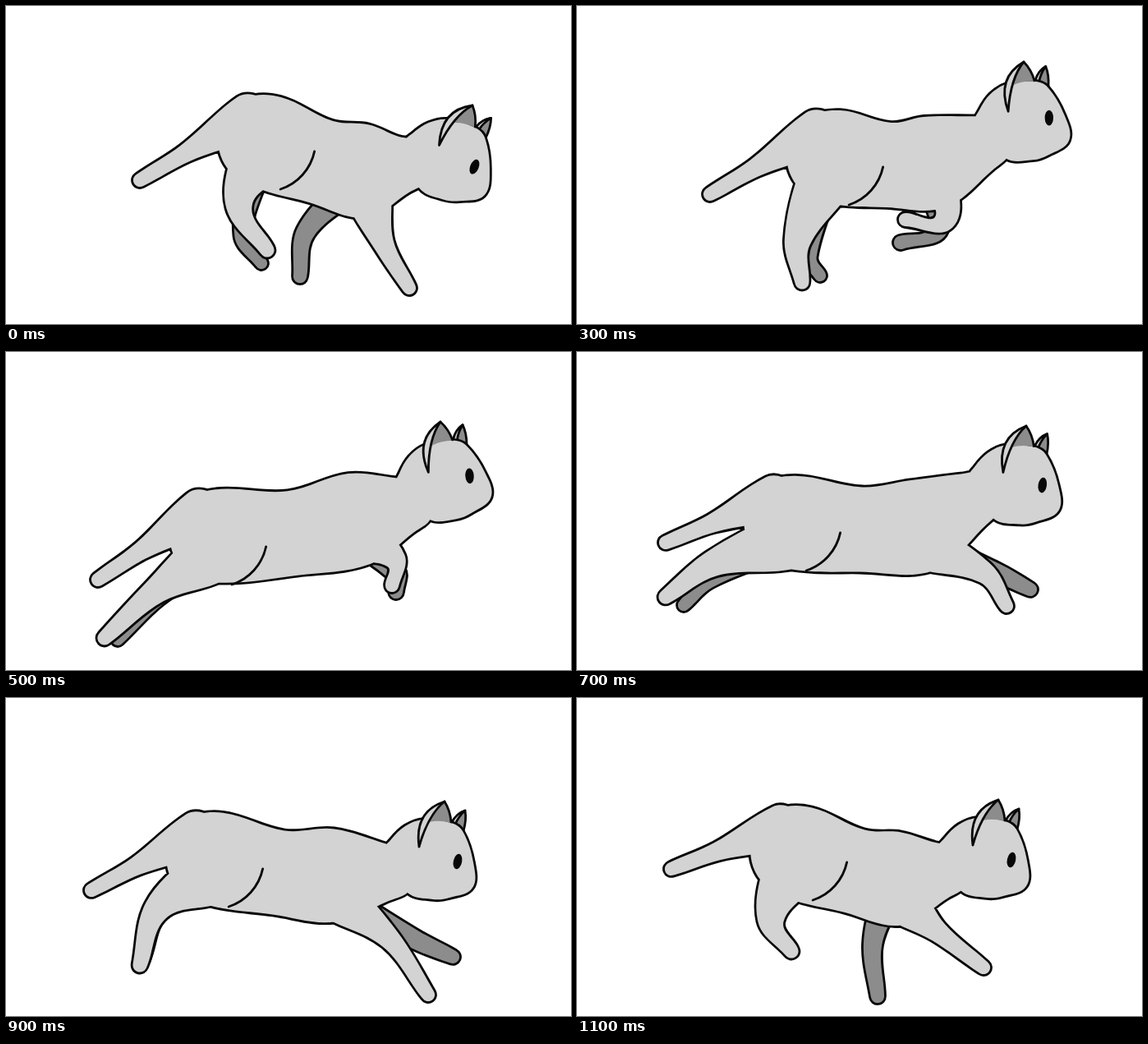
Write an HTML page that moves like this. It is 688 px wide and 387 px high and loops after 1200 ms.

```html
<!DOCTYPE html>
<html lang="en">
<head>
<meta charset="utf-8">
<title>Running cat</title>
<style>
  html, body { margin: 0; width: 100%; height: 100%; overflow: hidden; background: #fff; }
  svg { display: block; width: 100%; height: 100%; }
  path { stroke: #080808; stroke-width: 2.8; stroke-linecap: round; stroke-linejoin: round; fill: none; }
  /* The outline goes under the fill, so overlapping parts merge into one silhouette. */
  .merged { stroke-width: 5.6; paint-order: stroke; }
  .light { fill: #d3d3d3; }
  .dark { fill: #8c8c8c; }
  .bare { stroke: none; }
</style>
</head>
<body>
<svg viewBox="0 0 688 387">
  <path id="farHind" class="merged dark"/>
  <path id="farFront" class="merged dark"/>
  <g class="head">
    <path class="dark" d="M9,25Q15,15 25,11Q27,22 23,36"/>
    <path class="light" d="M13,28Q17,18 25,11Q15,14 9,25"/>
  </g>
  <path id="coat" class="merged light"/>
  <path id="haunch"/>
  <g class="head">
    <path class="dark bare" d="M0,0Q7,11 8,26Q-6,22 -19,25L-18,20Z"/>
    <path class="light" d="M-31,55Q-37,12 0,0Q-20,16 -31,55"/>
    <path d="M0,0Q7,11 8,25"/>
    <ellipse cx="16" cy="73" rx="5.2" ry="9.4" transform="rotate(12 16 73)" fill="#080808"/>
  </g>
</svg>
<script>
const BEAT = 100, BEATS = 12, LINE = 2.8;
const LEAP = { beat: 6, stretch: 0.09, center: 340 };
const TORSO = [58, 53, 58, 36];
const TAIL = [28, 12.5, 9.5];
const LIMBS = {
  farHind: { from: 'rump', offset: [-8, 25], radii: [18, 11, 8.5] },
  farFront: { from: 'chest', offset: [-15, 15], radii: [18, 12.5, 9.5] },
  hind: { from: 'rump', offset: [-8, 25], radii: [35, 17, 10] },
  front: { from: 'chest', offset: [0, 25], radii: [30, 14, 9.5] }
};
// Skull outline around the tip of the near ear.
const SKULL = [[8, 26], [22, 36], [35, 74], [34, 105], [6, 117], [-14, 119],
  [-46, 110], [-73, 60], [-65, 46], [-48, 30], [-26, 22]];

// Key poses by beat: ear tip and head tilt, body centres, tail tip, then middle joint and paw of each leg.
const poses = {
  0: { head: [568, 121, 10.5], rump: [315, 164], chest: [440, 201], tail: [163, 212],
    hind: [284, 245, 318, 297], front: [460, 290, 491, 343],
    farHind: [288, 280, 311, 313], farFront: [365, 275, 358, 329] },
  2: { head: [579, 91, 0], rump: [322, 164], chest: [455, 200], tail: [178, 233],
    hind: [337, 260, 361, 326], front: [413, 279, 384, 323],
    farHind: [326, 300, 345, 343], farFront: [400, 275, 367, 293] },
  3: { head: [544, 68, -12], rump: [312, 183], chest: [435, 190], tail: [162, 229],
    hind: [268, 288, 274, 336], front: [447, 262, 400, 260],
    farHind: [282, 305, 296, 328], farFront: [440, 272, 394, 288] },
  5: { head: [529, 85, -16], rump: [256, 224], chest: [430, 203], tail: [112, 277],
    hind: [182, 291, 120, 348], front: [475, 254, 470, 284],
    farHind: [184, 300, 136, 350], farFront: [476, 270, 475, 292] },
  7: { head: [547, 90, -3], rump: [260, 207], chest: [420, 211], tail: [108, 232],
    hind: [164, 258, 108, 298], front: [498, 270, 523, 309],
    farHind: [160, 278, 130, 308], farFront: [510, 268, 552, 289] },
  9: { head: [534, 126, 0], rump: [252, 195], chest: [400, 216], tail: [104, 234],
    hind: [183, 258, 163, 325], front: [468, 294, 514, 361],
    farHind: [188, 258, 167, 318], farFront: [500, 295, 544, 315] },
  11: { head: [513, 124, 0], rump: [268, 187], chest: [395, 220], tail: [115, 208],
    hind: [236, 272, 261, 308], front: [440, 285, 495, 328],
    farHind: [240, 268, 258, 304], farFront: [360, 300, 366, 363] }
};

const mean = (a, b) => a.map((v, i) => (v + b[i]) / 2);
const along = (a, b, t) => a.map((v, i) => v + (b[i] - v) * t);
const shift = ([x, y], [dx, dy]) => [x + dx, y + dy];
const polar = ([x, y], angle, r) => [x + r * Math.cos(angle), y + r * Math.sin(angle)];
const rootOf = (pose, name) => shift(pose[LIMBS[name].from], LIMBS[name].offset);
const joints = ([ax, ay, bx, by]) => [[ax, ay], [bx, by]];

// Halfway between two poses; legs swing about their roots instead of sliding.
function blend(a, b) {
  const pose = {};
  for (const part of ['head', 'rump', 'chest', 'tail']) pose[part] = mean(a[part], b[part]);
  for (const name in LIMBS) {
    const swing = source => {
      const [x, y] = rootOf(source, name);
      return joints(source[name]).map(([px, py]) =>
        [Math.atan2(py - y, px - x), Math.hypot(px - x, py - y)]);
    };
    const other = swing(b);
    pose[name] = swing(a).flatMap((s, i) => polar(rootOf(pose, name), ...mean(s, other[i])));
  }
  return pose;
}

// Lengthens the whole stride around the middle of the body.
function stretch(pose, { stretch, center }) {
  return Object.fromEntries(Object.entries(pose).map(([part, list]) => [part,
    list.map((v, i) => i === 0 || (i === 2 && part !== 'head') ? v + (v - center) * stretch : v)]));
}

const cycle = Array.from({ length: BEATS }, (_, i) => {
  const pose = poses[i] || blend(poses[i - 1], poses[(i + 1) % BEATS]);
  return i === LEAP.beat ? stretch(pose, LEAP) : pose;
});

// Closed smooth curve; handles scale with each segment to avoid loops.
function smooth(points) {
  const n = points.length, at = i => points[(i + n) % n];
  const tangent = i => {
    const [a, b] = [at(i - 1), at(i + 1)];
    return Math.atan2(b[1] - a[1], b[0] - a[0]);
  };
  let d = 'M' + points[0];
  for (let i = 0; i < n; i++) {
    const [p, q] = [at(i), at(i + 1)];
    const h = Math.hypot(q[0] - p[0], q[1] - p[1]) * 0.35;
    d += `C${polar(p, tangent(i), h)} ${polar(q, tangent(i + 1), -h)} ${q}`;
  }
  return d + 'Z';
}

// Round-ended tube along a spine with a radius at each joint.
function tube(spine, radii) {
  const last = spine.length - 1, turn = Math.PI / 4;
  const edge = (i, eighths) => {
    const a = spine[Math.max(i - 1, 0)], b = spine[Math.min(i + 1, last)];
    const heading = Math.atan2(b[1] - a[1], b[0] - a[0]);
    return polar(spine[i], heading + eighths * turn, radii[i] - LINE / 2);
  };
  const left = spine.map((_, i) => edge(i, -2));
  const right = spine.map((_, i) => edge(i, 2)).reverse();
  const cap = (i, from) => [0, 1, 2].map(k => edge(i, from + k));
  return smooth([...left, ...cap(last, -1), ...right, ...cap(0, 3)]);
}

const limb = (pose, name) => tube([rootOf(pose, name), ...joints(pose[name])], LIMBS[name].radii);

function draw(pose) {
  const { head: [x, y, tilt], rump, chest, tail } = pose;
  const onHead = ([px, py]) =>
    polar([x, y], Math.atan2(py, px) + tilt * Math.PI / 180, Math.hypot(px, py));
  const neck = onHead([-69, 86]);
  const loin = shift(mean(rump, chest), [6, 7]);
  const tailRoot = shift(rump, [-20, -30]);

  $('coat').setAttribute('d', [
    tube([rump, loin, chest, neck], TORSO),
    tube([tailRoot, along(tailRoot, tail, 0.58), tail], TAIL),
    limb(pose, 'hind'),
    limb(pose, 'front'),
    smooth(SKULL.map(onHead))
  ].join(''));
  for (const name of ['farHind', 'farFront']) $(name).setAttribute('d', limb(pose, name));

  const arc = degrees => polar(rump, degrees * Math.PI / 180, 62);
  $('haunch').setAttribute('d', `M${arc(72)}A62,62 0 0 0 ${arc(12)}`);
  for (const part of document.querySelectorAll('.head'))
    part.setAttribute('transform', `translate(${x} ${y}) rotate(${tilt})`);
}

function $(id) { return document.getElementById(id); }

let origin;
function tick(now) {
  origin ??= now;
  draw(cycle[Math.floor((now - origin) / BEAT) % BEATS]);
  requestAnimationFrame(tick);
}

draw(cycle[0]);
requestAnimationFrame(tick);
</script>
</body>
</html>
```
